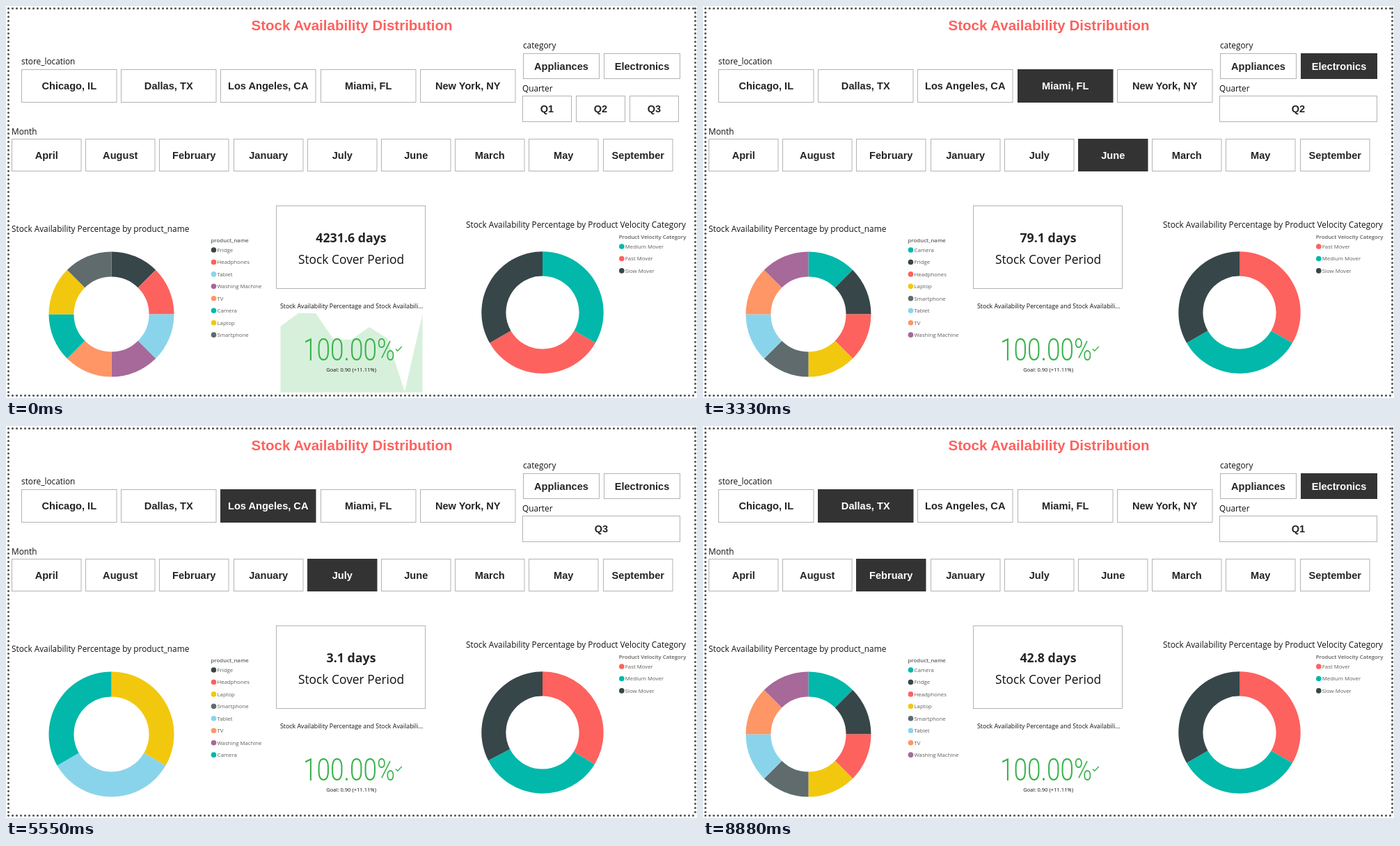
Animation, 993 px wide and 564 px high, one loop 9.99 s. Source, as an HTML page:

```html
<!DOCTYPE html>
<html lang="en">
<head>
<meta charset="utf-8">
<title>Stock Availability Distribution</title>
<style>
  html, body { margin: 0; width: 100%; height: 100%; overflow: hidden; background: #fff; }
  svg { display: block; width: 993px; height: 564px; }
  text { font-family: "Open Sans", "Noto Sans", sans-serif; fill: #111; }
  .title { font: bold 20.5px "Liberation Sans", Arial, sans-serif; fill: #fd625e; }
  .btn { font: bold 14.6px "Liberation Sans", Arial, sans-serif; fill: #252423; }
  .on { fill: #fff; }
  .label { font-size: 11.82px; }
  .legend { font-size: 7.8px; fill: #605e5c; }
  .head { font-size: 7.8px; font-weight: 600; fill: #605e5c; }
  .days { font-size: 17.8px; font-weight: 700; fill: #252423; }
  .card { font-size: 17.4px; }
  .kpi { font-size: 8.85px; }
  .goal { font-size: 7.6px; }
  .value { font: 300 44px Roboto, "Open Sans", sans-serif; }
  .mid { text-anchor: middle; }
</style>
</head>
<body>
<svg id="stage" viewBox="0 0 993 564"></svg>
<script>
const STEP = 1110;
const stage = document.getElementById('stage');

const COLOR = {
  Camera: '#01b8aa', Fridge: '#374649', Headphones: '#fd625e', Laptop: '#f2c80f',
  Smartphone: '#5f6b6d', Tablet: '#8ad4eb', TV: '#fe9666', 'Washing Machine': '#a66999',
  'Medium Mover': '#01b8aa', 'Fast Mover': '#fd625e', 'Slow Mover': '#374649'
};
const CITIES = ['Chicago, IL', 'Dallas, TX', 'Los Angeles, CA', 'Miami, FL', 'New York, NY'];
const MONTHS = ['April', 'August', 'February', 'January', 'July', 'June', 'March', 'May', 'September'];
const CATEGORIES = ['Appliances', 'Electronics'];

const AZ = ['Camera', 'Fridge', 'Headphones', 'Laptop', 'Smartphone', 'Tablet', 'TV', 'Washing Machine'];
const BY_STOCK = ['Fridge', 'Headphones', 'Tablet', 'Washing Machine', 'TV', 'Camera', 'Laptop', 'Smartphone'];
const PHONE_LAST = ['Camera', 'Fridge', 'Headphones', 'Laptop', 'Tablet', 'TV', 'Washing Machine', 'Smartphone'];
const CAMERA_LAST = ['Fridge', 'Headphones', 'Laptop', 'Smartphone', 'Tablet', 'TV', 'Washing Machine', 'Camera'];
const MOVERS = ['Fast Mover', 'Medium Mover', 'Slow Mover'];

// names: slice order, w: weights, lit: the only full-strength slice, part: share of a faded slice kept solid
const even = names => ({ names, w: {} });
const base = { quarters: ['Q2'], products: even(AZ), movers: even(MOVERS), value: '100.00%' };
const scene = props => ({ ...base, ...props });

const miami = { city: 'Miami, FL', month: 'June', days: '79.1' };
const newYork = { city: 'New York, NY', month: 'July', quarters: ['Q3'], days: '8.1' };
const angeles = {
  city: 'Los Angeles, CA', month: 'July', quarters: ['Q3'], days: '3.1',
  products: {
    names: CAMERA_LAST,
    w: { Fridge: 0, Headphones: 0, Smartphone: 0, TV: 0, 'Washing Machine': 0 }
  }
};
const uneven = { 'Slow Mover': .966 };
const dallas = { city: 'Dallas, TX', month: 'February', quarters: ['Q1'], days: '42.8' };

const SCENES = [
  scene({
    quarters: ['Q1', 'Q2', 'Q3'], days: '4231.6', area: true,
    products: even(BY_STOCK), movers: even(['Medium Mover', 'Fast Mover', 'Slow Mover'])
  }),
  scene({
    city: 'Chicago, IL', month: 'April', category: 'Appliances', days: '1.1', value: '66.67%',
    products: { names: PHONE_LAST, w: { Smartphone: 2 / 3 }, lit: 'Smartphone' },
    movers: {
      names: ['Fast Mover', 'Slow Mover', 'Medium Mover'],
      w: { 'Medium Mover': .966 }, lit: 'Slow Mover', part: { 'Medium Mover': .57 }
    }
  }),
  scene(miami),
  scene({ ...miami, category: 'Electronics' }),
  scene({ ...newYork, products: { names: AZ, w: {}, lit: 'TV' } }),
  scene({ ...angeles, movers: { names: MOVERS, w: uneven } }),
  scene({ ...angeles, movers: { names: MOVERS, w: uneven, lit: 'Fast Mover' } }),
  scene(dallas),
  scene({ ...dallas, category: 'Electronics' })
];

const text = (x, y, cls, str, extra = '') => `<text x="${x}" y="${y}" class="${cls}" ${extra}>${str}</text>`;
const box = (x, y, w, h, fill = '#fff') =>
  `<rect x="${x}" y="${y}" width="${w}" height="${h}" fill="${fill}" stroke="${fill === '#fff' ? '#b3b3b3' : fill}"/>`;

function button(x, y, w, h, str, on) {
  return box(x, y, w, h, on ? '#333' : '#fff') +
    text(x + w / 2, y + h / 2 + 5, 'btn mid' + (on ? ' on' : ''), str);
}

function row(names, x, y, w, h, pitch, picked) {
  return names.map((n, i) => button(Math.round(x + i * pitch) + .5, y, w, h, n, n === picked)).join('');
}

function ring(cx, cy, R, r, a, b, fill, opacity) {
  const at = (q, t) => `${(cx + q * Math.sin(t)).toFixed(2)} ${(cy - q * Math.cos(t)).toFixed(2)}`;
  const big = b - a > Math.PI ? 1 : 0;
  return `<path d="M${at(R, a)}A${R} ${R} 0 ${big} 1 ${at(R, b)}L${at(r, b)}A${r} ${r} 0 ${big} 0 ${at(r, a)}Z"
    fill="${fill}" opacity="${opacity}"/>`;
}

const strength = (data, name) => !data.lit || data.lit === name ? 1 : .4;

function donut(cx, cy, R, r, data) {
  const weight = n => data.w[n] ?? 1;
  const total = data.names.reduce((sum, n) => sum + weight(n), 0);
  let a = 0, out = '';
  for (const n of data.names) {
    const b = a + weight(n) / total * 2 * Math.PI;
    if (b > a) {
      out += ring(cx, cy, R, r, a, b, COLOR[n], strength(data, n));
      const part = data.part?.[n];
      if (part) out += ring(cx, cy, r + (R - r) * part, r, a, b, COLOR[n], 1);
    }
    a = b;
  }
  return out;
}

function legend(x, y, head, data) {
  return text(x - 4, y - 11, 'head', head) + data.names.map((n, i) => {
    const cy = y + i * 17.45;
    const alpha = data.part?.[n] ? 1 : strength(data, n);
    return `<circle cx="${x}" cy="${cy}" r="3.8" fill="${COLOR[n]}" opacity="${alpha}"/>` +
      text(x + 5, cy + 2.8, 'legend', n);
  }).join('');
}

function kpi(s) {
  const good = s.value === '100.00%';
  const color = good ? '#37b34a' : '#e81123';
  const area = s.area
    ? '<path d="M394.5 556V461L420 442H445L471 480H496L522 462L548 478L573 555L598.5 443V556Z" fill="#d7f0db"/>' : '';
  const sign = good
    ? `<path d="M560 493.5l2.8 2.8 6-6.3" fill="none" stroke="${color}" stroke-width="1.4"/>`
    : `<path d="M554.5 489v6m0 1.6v1.6" stroke="${color}" stroke-width="1.3"/>`;
  return area + sign +
    text(394, 435, 'kpi', 'Stock Availability Percentage and Stock Availabili...') +
    text(0, 0, 'value mid', s.value, `transform="translate(${good ? 493 : 492} 510) scale(.8 1)" style="fill:${color}"`) +
    text(496, 525.5, 'goal mid', `Goal: 0.90 (${good ? '+11.11' : '-25.93'}%)`);
}

const FRAME = '<rect width="993" height="564" fill="#fff"/>' +
  '<path d="M3.5 3.5H991M3.5 560.5H991M3.5 3.5V561M990.5 3.5V561" fill="none" stroke="#555" stroke-width="3.2" stroke-linecap="round" stroke-dasharray="0 6"/>' +
  text(497, 35, 'title mid', 'Stock Availability Distribution') +
  text(22, 84, 'label', 'store_location') +
  text(743, 61, 'label', 'category') +
  text(742, 122.5, 'label', 'Quarter') +
  text(8, 184.5, 'label', 'Month') +
  text(8, 325, 'label', 'Stock Availability Percentage by product_name') +
  text(661, 319, 'label', 'Stock Availability Percentage by Product Velocity Category') +
  box(388.5, 287.5, 214, 119) +
  text(496, 371, 'card mid', 'Stock Cover Period');

function draw(s) {
  return FRAME +
    row(CITIES, 22, 91.5, 136.5, 47, 143.2, s.city) +
    row(CATEGORIES, 743, 68.5, 109, 36, 115.5, s.category) +
    row(s.quarters, 742, 129.5, s.quarters.length > 1 ? 70 : 226, 37, 77, null) +
    row(MONTHS, 8, 191.5, 99.5, 46, 106.2, s.month) +
    text(496, 340, 'days mid', s.days + ' days') +
    donut(151.5, 443.5, 90, 54, s.products) +
    legend(298.5, 351, 'product_name', s.products) +
    donut(771, 441, 87.7, 52.6, s.movers) +
    legend(884.8, 346, 'Product Velocity Category', s.movers) +
    kpi(s);
}

const start = performance.now();
let shown = -1;
function tick() {
  const i = Math.floor((performance.now() - start) / STEP) % SCENES.length;
  if (i !== shown) stage.innerHTML = draw(SCENES[shown = i]);
  requestAnimationFrame(tick);
}
tick();
</script>
</body>
</html>
```
